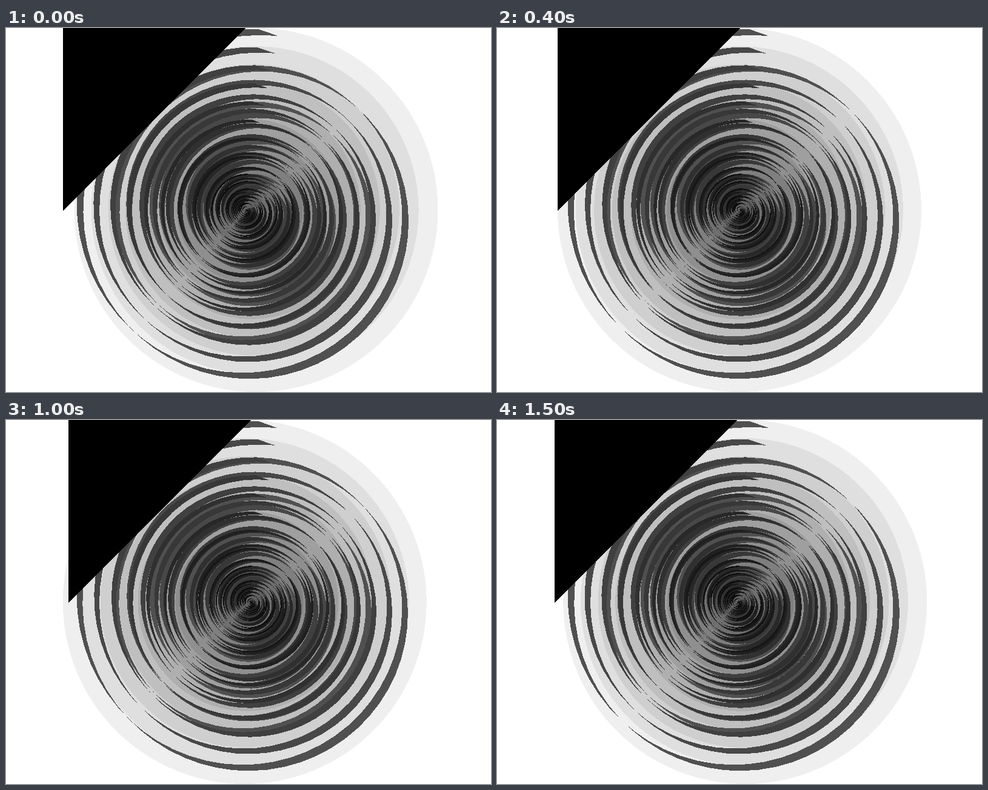
Write an HTML page that moves like this. It is 800x600 px and loops after 1600 ms.

```html
<!DOCTYPE html>
<html>
<head>
<meta charset="utf-8">
<style>
html, body { margin: 0; width: 100%; height: 100%; overflow: hidden; background: #fff; }
svg { display: block; }
</style>
</head>
<body>
<svg id="stage" width="800" height="600" shape-rendering="crispEdges"></svg>
<script>
const stage = document.getElementById('stage');
const LEVELS = 10, RADIUS = 298.2, PITCH = 60, STEP = Math.PI / 30;
const gray = v => `rgb(${v},${v},${v})`;

function add(tag, attrs) {
  const el = document.createElementNS('http://www.w3.org/2000/svg', tag);
  for (const name in attrs) el.setAttribute(name, attrs[name]);
  return stage.appendChild(el);
}

// Spiral that loses PITCH per turn; the angle runs counter-clockwise from the top.
function spiral(cx, cy, scale, first) {
  const points = [];
  for (let a = first; ; a += STEP) {
    const r = (RADIUS - PITCH * a / (2 * Math.PI)) * scale;
    if (r < 0) return points;
    points.push([cx - r * Math.sin(a), cy - r * Math.cos(a)]);
  }
}

// Ribbon between a spiral and its copy moved diagonally.
function ribbon(cx, scale, sway) {
  const upper = spiral(cx, 300, scale, -STEP / 2);
  const lower = spiral(cx + (10 - sway / 8) * scale, 300 + 10 * scale, scale, -0.127);
  return upper.concat(lower.reverse()).map(p => p.map(v => v.toFixed(2))).join(' ');
}

const circles = [], ribbons = [];
for (let i = 0; i < LEVELS; i++)
  circles.push(add('circle', { cy: 300, r: 300 - 30 * i, fill: gray(239 - 16 * i) }));
for (let i = 0; i < LEVELS; i++)
  ribbons.push(add('polygon', { fill: gray(80 - 8 * i) }));
const corner = add('polygon', { fill: '#000' });

function draw(sway) {
  for (let i = 0; i < LEVELS; i++) {
    const scale = 1 - i / LEVELS;
    const pivot = 400 + sway * (1 - scale);
    circles[i].setAttribute('cx', pivot - 2 * sway * scale);
    ribbons[i].setAttribute('points', ribbon(pivot, scale, sway));
  }
  const x = Math.round(100 + sway);
  corner.setAttribute('points', `${x},0 ${x + 301},0 ${x},301`);
}

const start = performance.now();
let shown = -1;
function tick() {
  const step = Math.floor((performance.now() - start) / 100) % 16;
  if (step !== shown) {
    shown = step;
    draw(6.25 - 1.5625 * Math.abs(step - 8));
  }
  requestAnimationFrame(tick);
}
tick();
</script>
</body>
</html>
```
